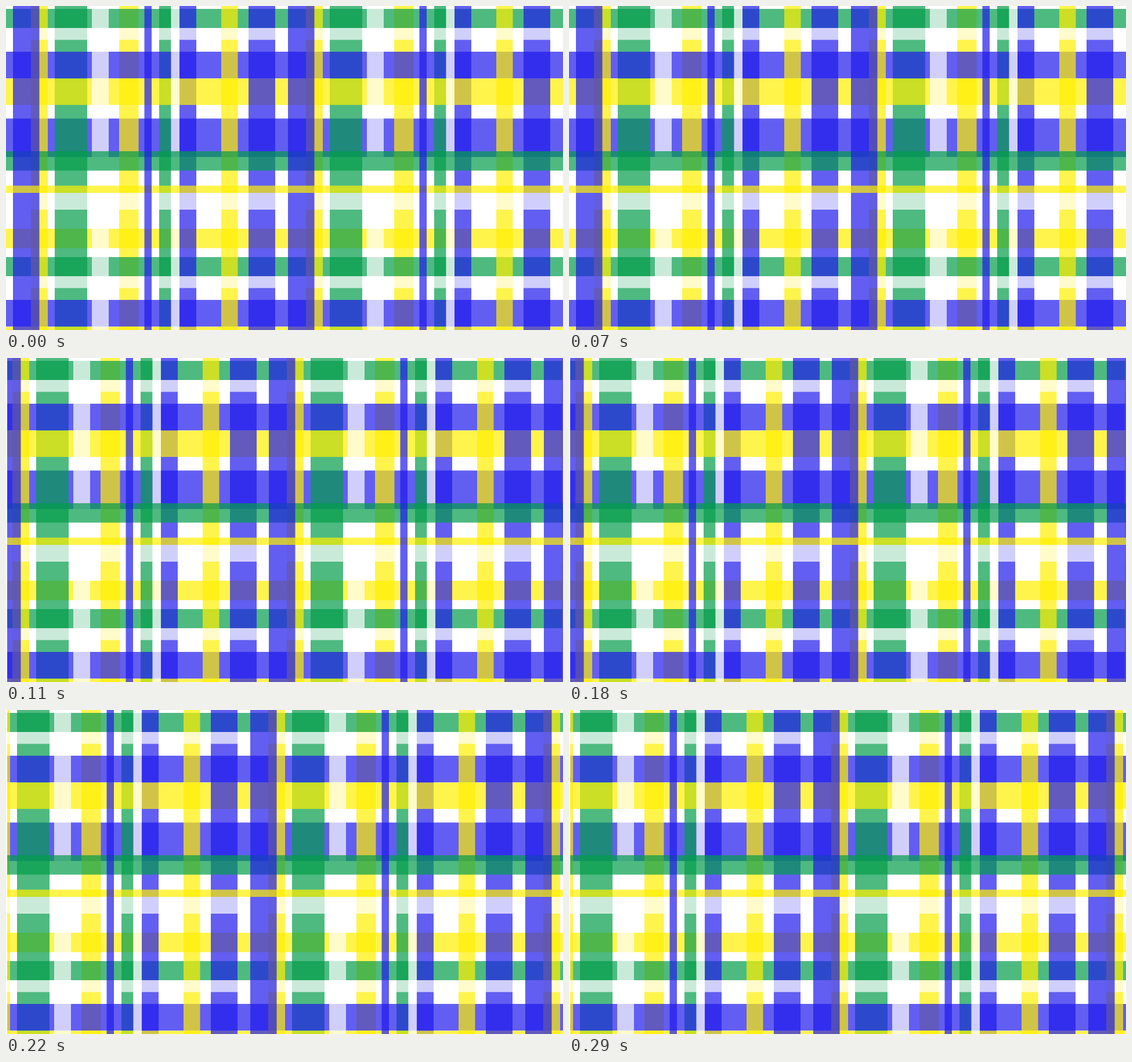
These frames come from a looping animation (960x560 px, 330 ms). An HTML page with a canvas:

```html
<!DOCTYPE html>
<html lang="en">
<head>
<meta charset="utf-8">
<title>Sliding plaid</title>
<style>
  html, body { margin: 0; width: 100%; height: 100%; overflow: hidden; background: #fff; }
  canvas { display: block; }
</style>
</head>
<body>
<canvas id="stage" width="960" height="560"></canvas>
<script>
const ctx = document.getElementById("stage").getContext("2d");
const WIDTH = 960, HEIGHT = 560;
const TILE_W = 474, TILE_H = 429;
const STEP_MS = 110;

const blue = "rgba(32,27,235,.7)";
const yellow = "rgba(255,240,0,.7)";
const green = "rgba(4,157,75,.7)";
const white = "rgba(255,255,255,.7)";

const row = (color, start, end) => ({ color, start, end, across: true });
const col = (color, start, end) => ({ color, start, end, across: false });

// Bands in weaving order, bottom to top.
const bands = [
  row(blue, 194.5, 261), row(yellow, 385, 418.5),
  col(green, 84, 140), col(green, 264, 284.5), col(yellow, 195, 228.5),
  row(green, 5, 38), row(blue, 79, 125),
  col(blue, 299, 328),
  row(yellow, 125.4, 171),
  col(yellow, 371, 399.5), col(yellow, 43, 72), col(blue, 418, 464),
  col(white, 148, 177), col(white, 284.5, 299),
  row(white, 38, 58.5), row(white, 323, 352), row(green, 251, 284.5),
  col(blue, 12, 57.5),
  row(yellow, 310.5, 323),
  col(blue, 238.5, 251)
];

// Sideways offset of each repeat, and the blank margin on the left.
const poses = [
  { shifts: [0, 0, 0], margin: 0 },
  { shifts: [-32, -33, -33], margin: 2 },
  { shifts: [-65, -65, -65], margin: 2 }
];

function paintBand({ color, start, end, across }, shifts) {
  ctx.fillStyle = color;
  const size = end - start;
  if (across) {
    for (let y = start; y < HEIGHT; y += TILE_H) ctx.fillRect(0, y, WIDTH, size);
  } else {
    shifts.forEach((shift, i) => ctx.fillRect(start + i * TILE_W + shift, 0, size, HEIGHT));
  }
}

function draw(time) {
  const { shifts, margin } = poses[Math.floor(time / STEP_MS) % poses.length];
  ctx.fillStyle = "#fff";
  ctx.fillRect(0, 0, WIDTH, HEIGHT);
  bands.forEach(band => paintBand(band, shifts));
  ctx.fillStyle = "#fff";
  ctx.fillRect(0, 0, margin, HEIGHT);
}

const began = performance.now();
function tick() {
  draw(performance.now() - began);
  requestAnimationFrame(tick);
}
tick();
</script>
</body>
</html>
```
